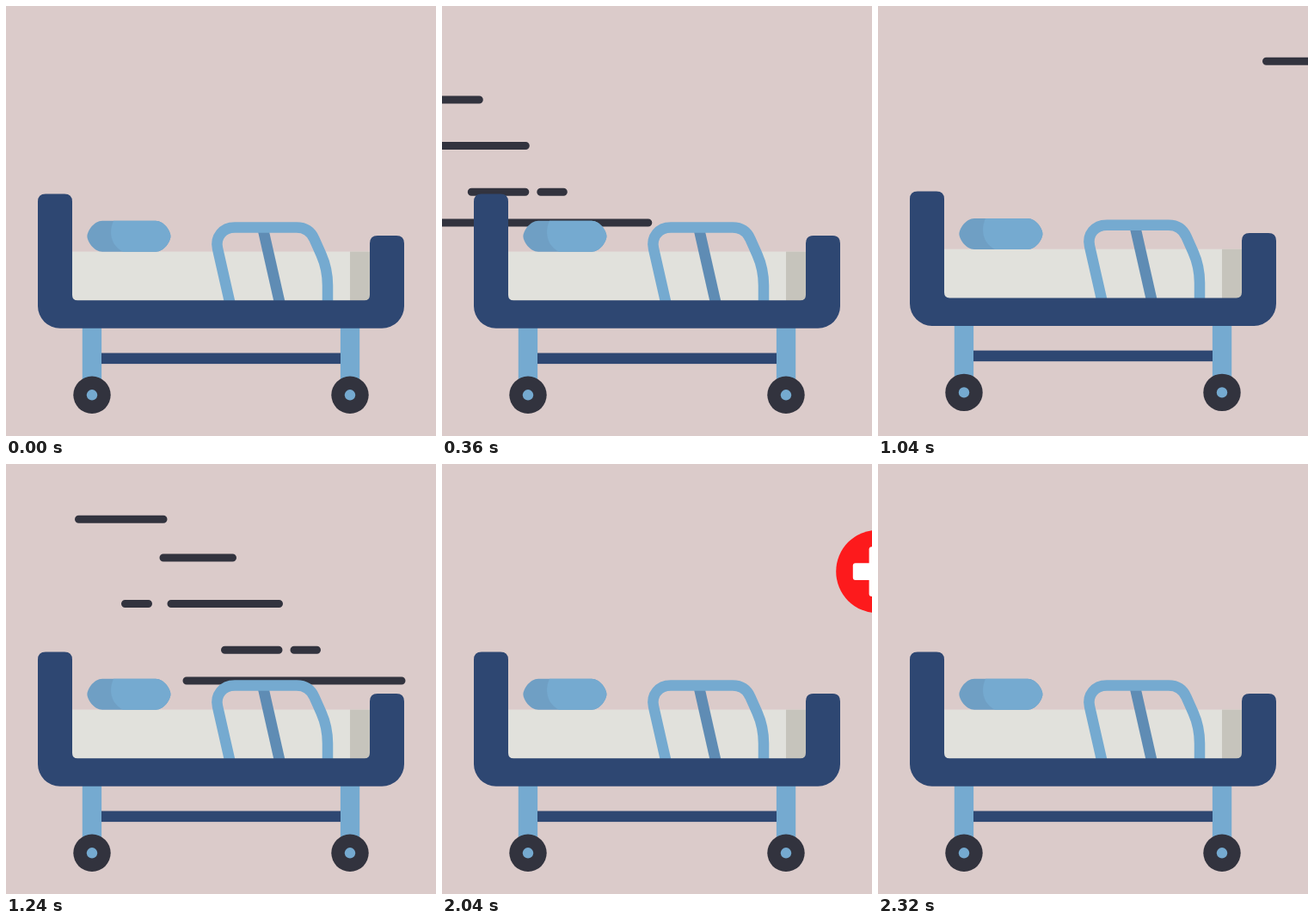
Animation of 500x500 px, one loop 3.04 s. Source, as an HTML page:

```html
<!DOCTYPE html>
<html lang="en">
<head>
<meta charset="utf-8">
<title>Hospital bed</title>
<style>
  html, body { margin: 0; width: 100%; height: 100%; overflow: hidden; background: #dbcbca; }
  svg { display: block; width: 100vw; height: 100vh; }
</style>
</head>
<body>
<svg viewBox="0 0 500 500">
  <g id="lines" fill="none" stroke="#32333e" stroke-width="9" stroke-linecap="round">
    <path d="M4.5 64.3H103 M103 109H183.5 M58.5 162.5H85.5 M112 162.5H237.5
             M174.5 216.2H237 M255 216.2H281.5 M130 252H380"/>
  </g>
  <g id="cross">
    <circle cy="125" r="48.3" fill="#fd1a1c"/>
    <g fill="#fff">
      <rect x="-28.7" y="115.2" width="57.4" height="19.8" rx="3"/>
      <rect x="-9.9" y="96.3" width="19.8" height="57.6" rx="3"/>
    </g>
  </g>
  <g id="bed">
    <rect x="76" y="285.6" width="348" height="60" fill="#e1e1dc"/>
    <rect x="400" y="285.6" width="24" height="60" fill="#c6c4bc"/>
    <path fill="#6f9fc4" d="M112 249.8H174C184 249.8 191.4 262 191.4 267.8S184 285.8 174 285.8H112C102 285.8 94.4 273.6 94.4 267.8S102 249.8 112 249.8Z"/>
    <path fill="#75aad0" d="M125 249.8H174C184 249.8 191.4 262 191.4 267.8S184 285.8 174 285.8H136C121 278 119.500 262 125 249.8Z"/>
    <path fill="#5f8cb4" d="M292.500 260H305.500L324.500 344H311.500Z"/>
    <path fill="none" stroke="#75aad0" stroke-width="12.500"
          d="M260.300 345L246 282C243 268.500 252 257.600 266 257.600H338C348 257.600 354.500 262 358.500 271L366.500 289Q374 306 374 325V345"/>
    <g fill="#75aad0">
      <rect x="88.800" y="373" width="22.300" height="64"/>
      <rect x="388.900" y="373" width="22.300" height="64"/>
    </g>
    <rect x="111" y="403.500" width="278" height="12.600" fill="#2e4772"/>
    <path fill="#2e4772" d="M37 227.500Q37 218.500 46 218.500H68Q77 218.500 77 227.500V336Q77 342.300 83.300 342.300H416.700Q423 342.300 423 336V276Q423 267 432 267H454Q463 267 463 276V349A25.800 25.800 0 0 1 437.200 374.800H62.800A25.800 25.800 0 0 1 37 349Z"/>
    <g fill="#32333e">
      <circle cx="100" cy="452.300" r="21.700"/>
      <circle cx="400" cy="452.300" r="21.700"/>
    </g>
    <g fill="#75aad0">
      <circle cx="100" cy="452.300" r="6.200"/>
      <circle cx="400" cy="452.300" r="6.200"/>
    </g>
  </g>
</svg>
<script>
  const LOOP = 3040, STEP = 40;
  const sweeps = [40, 1040];
  const bumps = [240, 640, 1040, 2120];
  const lift = [-2.9, -5, -2.9];
  const el = id => document.getElementById(id);
  const lines = el('lines'), cross = el('cross'), bed = el('bed');
  const move = (node, x, y) => node.setAttribute('transform', `translate(${x} ${y})`);

  // Slides left at a steady speed during its window, otherwise waits off stage.
  function slide(t, start, span, x, speed) {
    const dt = t - start;
    return dt >= 0 && dt < span ? x - dt * speed : 600;
  }

  function draw(now) {
    const t = Math.floor((now % LOOP) / STEP) * STEP;
    move(lines, Math.min(...sweeps.map(s => slide(t, s, 480, 447, 1.835))), 0);
    move(cross, slide(t, 2040, 280, 506.5, 2.13), 0);
    const bump = bumps.find(b => t >= b && t < b + lift.length * STEP);
    move(bed, 0, bump === undefined ? 0 : lift[(t - bump) / STEP]);
  }

  let start;
  function tick(now) {
    start ??= now;
    draw(now - start);
    requestAnimationFrame(tick);
  }
  draw(0);
  requestAnimationFrame(tick);
</script>
</body>
</html>
```
